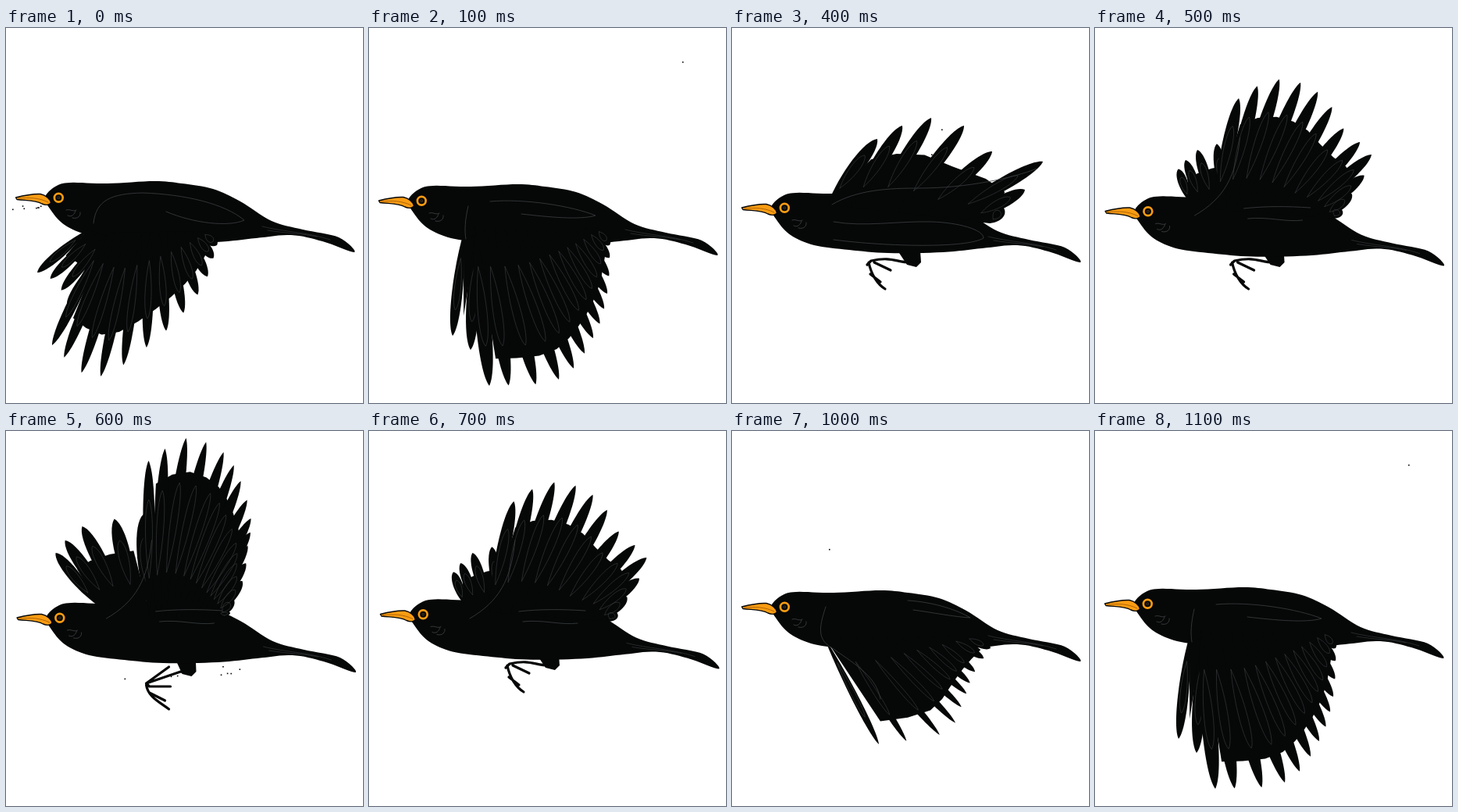
An HTML page with a canvas that plays this animation: 457x480 px, repeating every 1200 ms.

```html
<!DOCTYPE html>
<html lang="en">
<head>
<meta charset="utf-8">
<title>Flying blackbird</title>
<style>
html, body { margin: 0; width: 100%; height: 100%; overflow: hidden; background: #fff; }
canvas { display: block; }
</style>
</head>
<body>
<canvas id="stage" width="457" height="480"></canvas>
<script>
const ctx = document.getElementById('stage').getContext('2d');
const BLACK = '#060707', ORANGE = '#f99c12', GREY = '#3c4042';
const STEP = 100;

const mix = (a, b, t) => a + (b - a) * t;
const mixPoint = (p, q, t) => [mix(p[0], q[0], t), mix(p[1], q[1], t)];
const range = (n, fn) => Array.from({ length: n }, (_, i) => fn(i));

// Catmull-Rom point at u, where whole numbers fall on the keys.
function spline(keys, u, closed) {
  const n = keys.length;
  const i = closed ? Math.floor(u) : Math.min(Math.floor(u), n - 2);
  const t = u - i;
  const key = k => closed ? keys[(k + n) % n] : keys[Math.max(0, Math.min(n - 1, k))];
  const [a, b, c, d] = [-1, 0, 1, 2].map(k => key(i + k));
  return [0, 1].map(k => b[k] + t / 2 * (c[k] - a[k] +
    t * (2 * a[k] - 5 * b[k] + 4 * c[k] - d[k] + t * (3 * (b[k] - c[k]) + d[k] - a[k]))));
}

const sample = (keys, n) => range(n, i => spline(keys, i / (n - 1) * (keys.length - 1)));

// A fan of n feathers: roots on a line, tips on a curve, gaps cut in to a depth.
const fan = (n, roots, tips, widths, depth) => ({ n, roots, tips, widths, depth });

function blendFan(a, b) {
  const n = Math.round((a.n + b.n) / 2);
  const tips = sample(b.tips, n);
  return fan(n, a.roots.map((p, i) => mixPoint(p, b.roots[i], .5)),
    sample(a.tips, n).map((p, i) => mixPoint(p, tips[i], .5)),
    a.widths.map((w, i) => mix(w, b.widths[i], .5)), mix(a.depth, b.depth, .5));
}

const blend = (a, b, legs) => ({
  dy: mix(a.dy, b.dy, .5), legs, line: b.line,
  fans: a.fans.map((f, i) => b.fans[i] ? blendFan(f, b.fans[i]) : f)
});

const low = {
  dy: 0, specks: [7, 8, 226, 44, 6],
  line: 'M112 250C115 220 135 212 175 211C230 213 280 225 305 246C285 255 240 250 205 235',
  fans: [
    fan(12, [[130, 262], [250, 260]], [[59, 406], [115, 447], [193, 398], [249, 336], [270, 278]], [9, 9], .72),
    fan(4, [[105, 258], [140, 270]], [[40, 313], [65, 327], [78, 353]], [8, 9], .55)]
};
const down = {
  dy: 4, specks: [1, 401, 42, 1, 1],
  line: 'M127 228C123 245 122 260 124 270M155 222C200 218 260 228 290 240C270 246 230 242 195 238',
  fans: [
    fan(13, [[135, 255], [290, 255]], [[154, 458], [243, 450], [287, 397], [305, 340], [308, 278]], [13, 8], .83),
    fan(2, [[121, 262], [137, 268]], [[107, 394], [130, 412]], [9, 11], .75)]
};
const back = {
  dy: 8, specks: [1, 124, 150, 1, 1],
  line: 'M120 225C110 255 110 268 130 279C160 300 185 315 190 343M225 217C260 219 290 230 305 239C285 238 255 232 232 229',
  fans: [
    fan(10, [[117, 262], [295, 262]], [[188, 401], [273, 386], [297, 344], [309, 312], [331, 278]], [6, 7], .8)]
};
const swept = {
  dy: 13, legs: 'tucked', specks: [2, 255, 120, 45, 45],
  line: 'M128 226C160 207 200 205 240 205C300 205 360 192 390 180M130 248C170 255 210 247 255 248C290 249 322 258 322 269C300 282 200 280 130 271',
  fans: [
    fan(8, [[122, 226], [330, 250]],
      [[186, 142], [218, 125], [255, 115], [297, 125], [333, 158], [398, 171], [375, 207], [347, 229]], [12, 11], .63),
    fan(5, [[125, 222], [180, 222]], [[150, 205], [165, 190], [180, 180]], [6, 6], .6)]
};
const high = {
  dy: 22, legs: 'open', specks: [9, 150, 300, 180, 18],
  line: 'M127 240C165 218 180 190 185 140M190 231C215 228 245 228 275 230M195 244C220 241 245 249 265 246',
  fans: [
    fan(15, [[182, 238], [278, 238]],
      [[181, 38], [229, 9], [277, 27], [299, 64], [312, 112], [308, 147], [301, 192], [278, 230]], [10, 10], .82),
    fan(5, [[117, 224], [180, 224]], [[62, 156], [96, 122], [174, 107]], [10, 14], .62)]
};
const level = blend(back, swept);
const lift = blend(swept, high, 'tucked');
const CYCLE = [low, down, back, level, swept, lift, high, lift, swept, level, back, down];

// Body outline at the highest point of the bob.
const BODY = [
  [50, 217], [63, 203], [82, 198], [130, 199], [190, 196], [225, 199], [265, 206], [300, 222],
  [340, 247], [380, 258], [426, 268], [446, 287], [405, 273], [365, 265], [320, 269],
  [270, 274], [200, 275], [150, 271], [105, 265], [75, 252], [58, 234]
];
const LEGS = {
  tucked: 'M228 300C210 300 205 292 178 298L173 303M175 300C178 315 186 328 196 334M177 315L190 325M182 300L203 310',
  open: 'M207 302L178 323M235 311L222 308L181 322M178 323L182 327L209 327M178 325C180 340 195 347 207 356M182 335L202 345'
};

function fillShape(points) {
  ctx.beginPath();
  points.forEach(p => ctx.lineTo(...p));
  ctx.fill();
}

function stroke(d, color, width) {
  ctx.strokeStyle = color;
  ctx.lineWidth = width;
  ctx.stroke(new Path2D(d));
}

function leaf(p, q, w) {
  const len = Math.hypot(q[0] - p[0], q[1] - p[1]) || 1;
  const at = (t, side) => {
    const [x, y] = mixPoint(p, q, t);
    return [x - (q[1] - p[1]) / len * w * side, y + (q[0] - p[0]) / len * w * side];
  };
  ctx.beginPath();
  ctx.moveTo(...p);
  ctx.bezierCurveTo(...at(.4, 1), ...at(.9, 1), ...q);
  ctx.bezierCurveTo(...at(.9, -1), ...at(.4, -1), ...p);
}

function drawFan({ n, roots, tips, widths, depth }) {
  const feathers = sample(tips, n).map((tip, i) => {
    const t = i / (n - 1);
    return { root: mixPoint(...roots, t), tip, w: mix(...widths, t) };
  });
  const gaps = feathers.slice(1).map((f, i) => {
    const g = feathers[i];
    return mixPoint(mixPoint(f.root, g.root, .5), mixPoint(f.tip, g.tip, .5), depth);
  });
  fillShape([...roots, ...gaps.reverse()]);
  for (const f of feathers) {
    leaf(f.root, f.tip, f.w);
    ctx.fill();
  }
  ctx.strokeStyle = GREY;
  ctx.lineWidth = .6;
  for (const f of feathers) {
    leaf(mixPoint(f.root, f.tip, .25), mixPoint(f.root, f.tip, .75), f.w * .6);
    ctx.stroke();
  }
}

function drawLegs(kind) {
  const drop = kind === 'open' ? 8 : 0;
  fillShape([[212, 285], [241, 285], [242, 300 + drop], [236, 306 + drop], [224, 303 + drop]]);
  stroke(LEGS[kind], BLACK, 3.2);
}

function ring(r, color, width) {
  ctx.beginPath();
  ctx.arc(67.3, 217.3, r, 0, 7);
  ctx.strokeStyle = color;
  ctx.lineWidth = width;
  ctx.stroke();
}

function drawHead() {
  const beak = 'M12.5 217C24 214 34 212 44 212.5C51 214 57 219 57.5 224C55 227 50 227 46 225C38 220 26 221 14 219.5Z';
  ctx.fillStyle = ORANGE;
  ctx.fill(new Path2D(beak));
  stroke(beak, BLACK, 1.4);
  stroke('M15 218C30 217 42 217 54 223', '#a85f08', .9);
  ring(5.4, ORANGE, 2.7);
  ring(1.4, '#352b1c', 1.2);
  stroke('M77 233C82 231 86 236 90 233M79 240C84 243 88 238 89 234M85 243C92 245 96 240 95 236', GREY, .9);
}

function drawSpecks(count, x, y, w, h) {
  let seed = 7;
  const random = () => (seed = seed * 16807 % 2147483647) / 2147483647;
  range(count, () => ctx.fillRect(x + random() * w, y + random() * h, 1.6, 1.6));
}

function draw(tick) {
  const pose = CYCLE[tick];
  const sway = Math.max(0, 2 * Math.sin(Math.PI * (tick - 4.5) / 5.5));
  ctx.setTransform(1, 0, 0, 1, 0, 0);
  ctx.fillStyle = '#fff';
  ctx.fillRect(0, 0, 457, 480);
  ctx.translate(sway, 0);
  ctx.fillStyle = BLACK;
  if (pose.specks) drawSpecks(...pose.specks);
  if (pose.legs) drawLegs(pose.legs);
  ctx.translate(0, pose.dy);
  fillShape(range(BODY.length * 8, i => spline(BODY, i / 8, true)));
  stroke('M328 254C355 261 385 261 415 271M335 259C360 263 380 263 398 267', GREY, .6);
  ctx.translate(0, -pose.dy);
  [...pose.fans].reverse().forEach(f => {
    ctx.fillStyle = BLACK;
    drawFan(f);
  });
  stroke(pose.line, GREY, .8);
  ctx.translate(0, pose.dy);
  drawHead();
}

ctx.lineCap = ctx.lineJoin = 'round';
const start = performance.now();
let shown = -1;
function play(now) {
  const tick = Math.floor(Math.max(0, now - start) / STEP) % CYCLE.length;
  if (tick !== shown) draw(shown = tick);
  requestAnimationFrame(play);
}
play(start);
</script>
</body>
</html>
```
